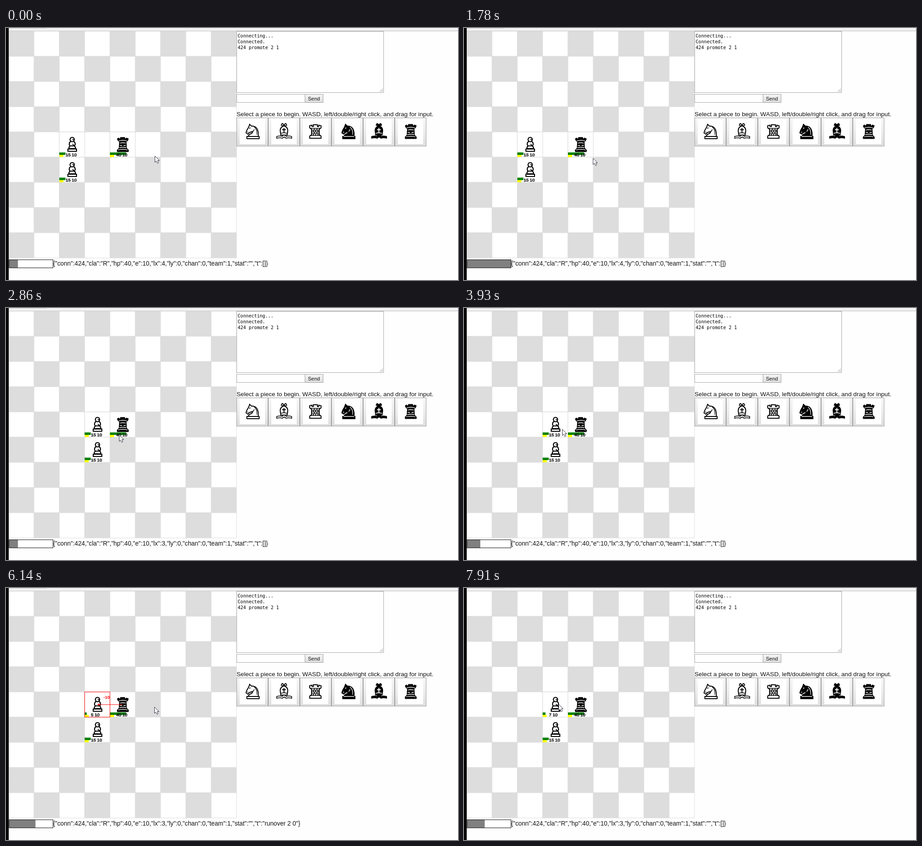
These frames come from a looping animation (1000 px wide and 560 px high, 8000 ms). An HTML page with a canvas:

```html
<!DOCTYPE html>
<html lang="en">
<head>
<meta charset="utf-8">
<title>Board game</title>
<style>
html, body { margin: 0; width: 100%; height: 100%; overflow: hidden; background: #fefefe; }
canvas { display: block; }
</style>
</head>
<body>
<canvas id="stage" width="1000" height="560"></canvas>
<script>
const g = document.getElementById('stage').getContext('2d');
const LOOP = 8000, CELL = 56, SANS = '"Liberation Sans", Arial, sans-serif';
const MONO = '"DejaVu Sans Mono", monospace';

// Screen refreshes: [index, ms], evenly spaced in between
const refreshes = [[0, 0], [1, 130], [8, 1120], [9, 1240], [13, 1780], [14, 1920], [16, 2190],
  [17, 2310], [24, 3240], [25, 3390], [29, 3930], [32, 4350], [33, 4480], [39, 5280], [40, 5440],
  [41, 5590], [45, 6140], [48, 6550], [49, 6680], [56, 7650], [57, 7770], [58, 7910], [59, 8000]];
// Pointer: ms, x, y
const pointer = [[0, 329, 284], [1120, 329, 284], [1780, 285, 289], [1920, 283, 289], [2310, 283, 289],
  [3240, 225, 276], [3930, 217, 269], [4350, 329, 264], [5440, 329, 264], [6140, 328, 264],
  [6680, 328, 264], [7650, 209, 258], [8000, 209, 258]];

function refreshTime(t) {
  const i = refreshes.findIndex(r => r[1] > t);
  const [n0, t0] = refreshes[i - 1], [n1, t1] = refreshes[i];
  const step = (t1 - t0) / (n1 - n0);
  return t0 + Math.floor((t - t0) / step) * step;
}

function pointerAt(t) {
  const i = pointer.findIndex(p => p[0] > t), a = pointer[i - 1], b = pointer[i];
  const f = (t - a[0]) / (b[0] - a[0]);
  return [1, 2].map(k => Math.round(a[k] + (b[k] - a[k]) * f));
}

// Filled box with an optional border inside its edge
function box(x, y, w, h, fill, line) {
  g.fillStyle = fill;
  g.fillRect(x, y, w, h);
  if (line) outline(x + .5, y + .5, w - 1, h - 1, line);
}

function outline(x, y, w, h, color) {
  g.strokeStyle = color;
  g.lineWidth = 1;
  g.strokeRect(x, y, w, h);
}

function label(s, x, y, size, color = '#111', family = SANS, weight = '') {
  g.font = `${weight} ${size}px ${family}`;
  g.fillStyle = color;
  g.fillText(s, x, y);
}

function shape(d, fill, line = '#000', width = 2) {
  const p = new Path2D(d);
  if (fill) { g.fillStyle = fill; g.fill(p); }
  if (line) { g.strokeStyle = line; g.lineWidth = width; g.stroke(p); }
}

// Pieces are drawn around the centre of their cell
const pieces = {
  pawn() {
    shape('M-3 -7C-7 -4 -7 1 -4 3Q-7 5 -7 9H8Q8 5 5 3C8 1 8 -4 4 -7Z', '#fff', '#000', 2.2);
    shape('M-9 10H10V15H-9Z', '#fff', '#000', 2.2);
    shape('M.5 -16A4.800 4.800 0 1 1 .4 -16Z', '#fff', '#000', 2.2);
    shape('M1 -12L4 -10M1 -1L6 3M-4 3H5', null, '#000', 2);
  },
  rook(dark) {
    if (dark) {
      shape('M-12 -13L-8 -15V-13H-5V-16H5V-13H8V-15L13 -13L11 -8L8 -6L9 8L13 12V16H-12V12L-8 8L-7 -6L-10 -8Z', '#000', '#000', 1);
      shape('M-9 -8Q.5 -11 10 -8M-6 -3Q.5 -5 7 -3M-6 2H-1M2 2H7M-7 7Q.5 5 8 7M-10 12Q.5 9 11 12', null, '#fff', 1.3);
    } else {
      shape('M-13 -13L-8 -14V-11H-5V-15H4V-11H7V-14L12 -13V-8L8 -5V7L12 10V15H-13V10L-9 7V-5L-13 -8Z', '#fff', '#000', 2);
      shape('M-11 -7H10M-9 -3H8M-9 1H8M-9 5H8M-11 9H10M-3 -7V-3M3 -7V-3M-5 -3V1M0 -3V1M5 -3V1M-3 1V5M3 1V5M-5 5V9M0 5V9M5 5V9', null, '#000', 1.5);
    }
  },
  knight(dark) {
    const ink = dark ? '#000' : '#fff', mark = dark ? '#fff' : '#000';
    if (dark) g.translate(2, 0);
    shape('M-9 11Q-9 7 -1 4L1 0L-6 2L-10 6L-14 3L-12 -3L-8 -10L-6 -16L-2 -12Q7 -13 11 -5Q14 2 13 11Z', ink, '#000', 2);
    shape('M-12 11H15V16H-12Z', ink, '#000', 2);
    shape('M-7 -7L-4 -8M-11 1L-9 2M-10 11H13', null, mark, 1.5);
    shape('M1 0Q4 -2 4 -5M4 -10Q11 -5 10 7', null, mark, 1.3);
  },
  bishop(dark) {
    const ink = dark ? '#000' : '#fff', mark = dark ? '#fff' : '#000';
    shape('M-16 11Q-9 9 -4 11L-2 8H3L5 11Q10 9 17 11V15Q10 13 5 15L.5 12L-4 15Q-9 13 -16 15Z', ink, '#000', 1.6);
    shape('M-7 8L-8 1Q-10 -9 0 -13Q10 -9 8 1L7 8Z', ink, '#000', 2);
    shape('M0 -12L-6 -14L-4 -18L-1 -16ZM0 -12L6 -14L4 -18L1 -16Z', ink, '#000', 1.8);
    shape('M0 -8V3M-4 -4H4', null, mark, 2);
    shape('M-7 4Q0 2 7 4', null, mark, 1.5);
  }
};

function piece(kind, x, y, dark) {
  g.save();
  g.translate(x + 28, y + 28);
  pieces[kind](dark);
  g.restore();
}

function unit(kind, x, y, hp, dark) {
  box(x, y, CELL, CELL, '#fff');
  outline(x, y, CELL, CELL, '#ddd');
  piece(kind, x, y, dark);
  box(x, y + 45.5, hp * .9, 5.5, '#008000');
  box(x, y + 51, 9, 5, '#ff0');
  label(hp + ' 10', x + 14, y + 54, 9.8, '#000');
  g.strokeStyle = '#000';
  g.lineWidth = .5;
  g.strokeText(hp + ' 10', x + 14, y + 54);
}

function board(tick) {
  const moved = tick >= 21;
  for (let r = 0; r < 9; r++)
    for (let c = 0; c < 9; c++) {
      const x = 6 + c * CELL, y = 7 + r * CELL;
      box(x, y, CELL, CELL, (r + c + moved) % 2 ? '#fff' : '#ddd');
      outline(x, y, CELL, CELL, '#ddd');
    }

  const hp = tick < 61 ? 15 : tick < 71 ? 5 : tick < 81 ? 6 : 7;
  const x = moved ? 174 : 118;
  unit('pawn', x, 231, hp);
  unit('pawn', x, 287, 15);
  unit('rook', 230, 231, 40, true);

  if (tick >= 61 && tick < 71) {
    outline(174, 231, CELL, CELL, '#f00');
    shape('M258 259H203', null, '#f00', 1);
    shape('M202 259L207 256.500V261.500Z', '#f00', null);
    label('-10', 215.500, 246, 9.8, '#f00', SANS, 'bold');
  }
}

function status(tick) {
  const order = tick >= 21 && tick < 31 ? '"runover 3 0"' : tick >= 61 && tick < 71 ? '"runover 2 0"' : '[]';
  const lx = tick < 21 ? 4 : 3;
  box(7, 515, 97, 18, '#fff');
  box(7, 515, 9.7 * ((tick - 1) % 10 + 1), 18, '#808080');
  outline(7, 515, 97, 18, '#000');
  label(`{"conn":424,"cla":"R","hp":40,"e":10,"lx":${lx},"ly":0,"chan":0,"team":1,"stat":"","t":${order}}`, 104, 528, 13.71);
}

function gradient(y, h, ...stops) {
  const f = g.createLinearGradient(0, y, 0, y + h);
  stops.forEach((c, i) => f.addColorStop(i / (stops.length - 1), c));
  return f;
}

function panel() {
  box(510, 7, 326, 137, '#fff', '#a9a9a9');
  ['Connecting...', 'Connected.', '424 promote 2 1'].forEach((s, i) =>
    label(s, 512.500, 20.500 + i * 13, 10.15, '#000', MONO));
  shape('M827 142L834 135M831 142L834 139', null, '#888', 1);

  box(510, 147, 152, 19, '#fff', '#a9a9a9');
  box(661, 147, 41, 19, gradient(147, 19, '#f6f6f6', '#ddd'), '#a0a0a0');
  label('Send', 668, 161, 11.4);
  label('Select a piece to begin. WASD, left/double/right click, and drag for input.', 510, 196, 13.65);

  ['knight', 'bishop', 'rook'].forEach((kind, i) => {
    for (const dark of [false, true]) {
      const x = 510 + (i + dark * 3) * 70;
      box(x, 199, 70, 64, gradient(199, 64, '#f6f6f6', '#ececec', '#dcdcdc'), '#a0a0a0');
      box(x + 7, 202, CELL, CELL, '#fff');
      piece(kind, x + 7, 202, dark);
    }
  });
}

function cursor(x, y) {
  g.save();
  g.translate(x + .5, y + .5);
  shape('M0 0V14L3 11L5.500 16L8 15L6 10H10Z', '#fff', '#334', 1);
  g.restore();
}

function draw(now) {
  const t = refreshTime(now % LOOP);
  const tick = Math.floor(2.51 + t * .01038);
  box(0, 0, 1000, 560, '#fefefe');
  box(0, 0, 1000, 6, '#f3f3f3');
  box(6, 0, 84, 1, '#ccc');
  box(0, 6, 1000, 1, '#b4b4b4');
  board(tick);
  box(0, 0, 6, 560, '#000');
  status(tick);
  panel();
  cursor(...pointerAt(t));
}

const start = performance.now();
function loop() {
  draw(performance.now() - start);
  requestAnimationFrame(loop);
}
loop();
</script>
</body>
</html>
```
